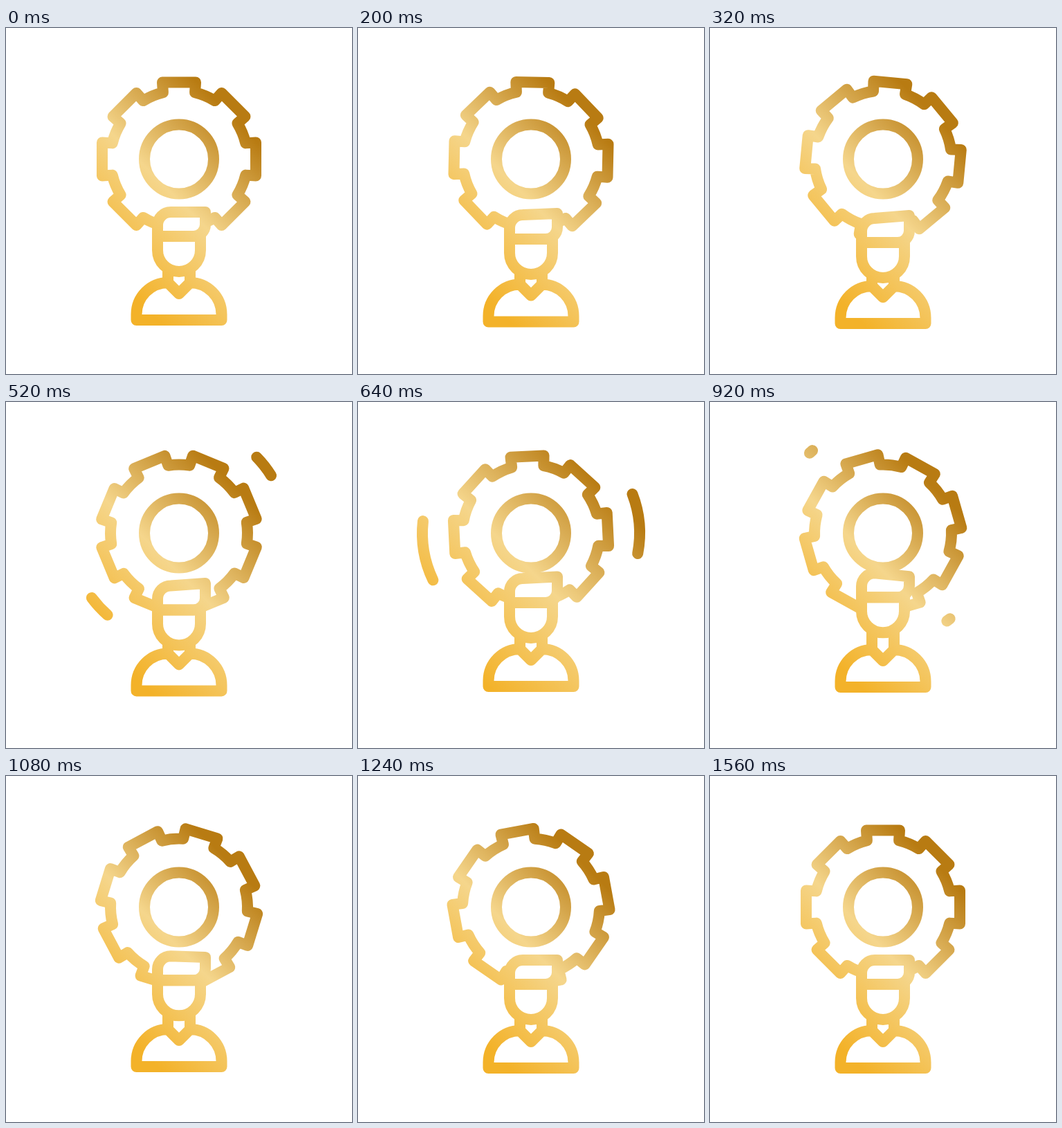
Recreate the animation shown at these times as an HTML page with a canvas. Size 500 by 500 pixels, loop 1.68 s.

```html
<!DOCTYPE html>
<html lang="en">
<head>
<meta charset="utf-8">
<title>Worker and gear</title>
<style>
  html, body { margin: 0; width: 100%; height: 100%; overflow: hidden; background: #fff; }
  canvas { display: block; width: 100vw; height: 100vh; }
</style>
</head>
<body>
<canvas id="stage"></canvas>
<script>
const LOOP = 1680, STEP = 40, SIZE = 500;
const CX = 250, CY = 189.5, LINE = 16;
const SWOOSH_R = 157, SWOOSH_FROM = 126.2, SWOOSH_SPAN = 103.3;

const canvas = document.getElementById('stage');
const ctx = canvas.getContext('2d');
const ratio = window.devicePixelRatio || 1;
canvas.width = canvas.height = SIZE * ratio;
ctx.scale(ratio, ratio);
ctx.lineWidth = LINE;
ctx.lineCap = ctx.lineJoin = 'round';

const rad = deg => deg * Math.PI / 180;
const clamp = v => Math.min(1, Math.max(0, v));

// cubic-bezier(0.6, 0, 0.4, 1) between two times
function ease(time, from, to) {
  const x = clamp((time - from) / (to - from));
  if (x === 0 || x === 1) return x;
  let lo = 0, hi = 1;
  for (let i = 0; i < 30; i++) {
    const u = (lo + hi) / 2;
    if (u * (1.8 - 2.4 * u + 1.6 * u * u) < x) lo = u; else hi = u;
  }
  return lo * lo * (3 - 2 * lo);
}

// Monotone cubic curve through [time, value] keys
function curve(keys) {
  const slope = i => (keys[i + 1][1] - keys[i][1]) / (keys[i + 1][0] - keys[i][0]);
  const tangents = keys.map((key, i) => {
    if (i === 0 || i === keys.length - 1) return 0;
    const a = slope(i - 1), b = slope(i);
    return a * b > 0 ? 2 * a * b / (a + b) : 0;
  });
  return time => {
    if (time <= keys[0][0]) return keys[0][1];
    const i = keys.findIndex(key => key[0] > time) - 1;
    if (i < 0) return keys[keys.length - 1][1];
    const [t0, v0] = keys[i], [t1, v1] = keys[i + 1];
    const d = t1 - t0, u = (time - t0) / d, w = 1 - u;
    return v0 * w * w * (1 + 2 * u) + v1 * u * u * (1 + 2 * w)
      + d * u * w * (tangents[i] * w - tangents[i + 1] * u);
  };
}

const headY = curve([[80, 0], [340, 9.2], [640, -11], [800, -25], [920, -18.7], [1200, 0]]);
const bodyY = curve([[80, 0], [320, 5], [640, -11], [790, -14], [920, -10], [1160, 0]]);
const brimTilt = curve([[80, 0], [320, -4], [640, -2.5], [800, 6.5], [920, 5], [1200, 0]]);

function gold(reach, bottom) {
  const top = 69, cy = (top + bottom) / 2;
  const half = (2 * reach + bottom - top) / 4;
  const g = ctx.createLinearGradient(CX + half, cy - half, CX - half, cy + half);
  g.addColorStop(0.17, '#b87b12');
  g.addColorStop(0.5, '#f5d68c');
  g.addColorStop(0.84, '#f3b229');
  return g;
}

function gear(turn) {
  const path = new Path2D();
  for (let k = 0; k < 8; k++) {
    const a = turn + k * 45 - 90;
    for (const side of [-12.2, 12.2]) {
      const p = rad(a + side);
      path.lineTo(CX + 113.6 * Math.cos(p), CY + 113.6 * Math.sin(p));
    }
    path.arc(CX, CY, 99, rad(a + 13.5), rad(a + 31.5));
  }
  path.closePath();
  return path;
}

function ring() {
  const path = new Path2D();
  path.arc(CX, CY, 50, 0, 2 * Math.PI);
  return path;
}

function swoosh(from, to) {
  const path = new Path2D();
  path.arc(CX, CY, SWOOSH_R, rad(from), rad(to));
  return path;
}

const body = y => new Path2D(
  `M188.5 ${422 + y}v-8a45.5 46 0 0 1 45.5 -46l16 16l16 -16a45.5 46 0 0 1 45.5 46v8z`);

const neck = (head, torso) => new Path2D(
  `M234 ${347 + head}V${368 + torso}M266 ${347 + head}V${368 + torso}`);

const face = y => new Path2D(`M219 ${301 + y}v20a31 31 0 0 0 62 0v-20z`);

const hat = (y, tilt) => new Path2D(
  `M219 ${301 + y}v-16a19 19 0 0 1 19 -19L288 ${266 + y + tilt}` +
  `V${284 + y}a17 17 0 0 1 -17 17z`);

function draw(time) {
  const head = headY(time), torso = bodyY(time);
  const from = ease(time, 400, 1000), to = ease(time, 320, 920);
  const a0 = SWOOSH_FROM + SWOOSH_SPAN * from;
  const a1 = SWOOSH_FROM + SWOOSH_SPAN * to;
  const flying = to > from;

  // The gradient spans whatever is visible
  let reach = 119;
  if (flying) {
    const level = a0 < 180 && a1 > 180
      ? 1 : Math.max(-Math.cos(rad(a0)), -Math.cos(rad(a1)));
    reach = Math.max(reach, SWOOSH_R * level + LINE / 2);
  }

  ctx.fillStyle = '#fff';
  ctx.fillRect(0, 0, SIZE, SIZE);
  ctx.strokeStyle = gold(reach, 430 + torso);

  ctx.stroke(gear(180 * ease(time, 80, 1560)));
  ctx.stroke(ring());
  if (flying) {
    ctx.stroke(swoosh(a0, a1));
    ctx.stroke(swoosh(a0 - 175.5, a1 - 175.5));
  }
  ctx.stroke(body(torso));
  ctx.stroke(neck(head, torso));

  const parts = [face(head), hat(head, brimTilt(time))];
  parts.forEach(part => ctx.fill(part));
  parts.forEach(part => ctx.stroke(part));
}

const start = performance.now();
function tick() {
  const time = (performance.now() - start) % LOOP;
  draw(Math.floor(time / STEP) * STEP);
  requestAnimationFrame(tick);
}
tick();
</script>
</body>
</html>
```
